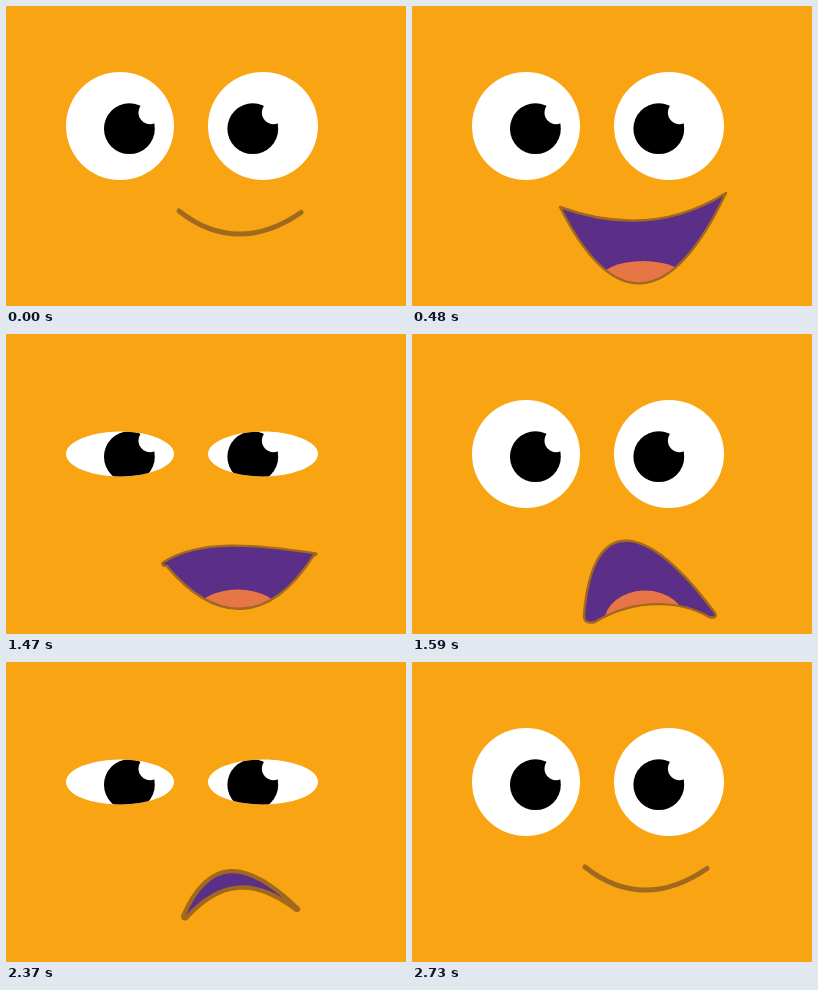
An HTML page that plays this animation: 400x300 px, repeating every 2.91 s.

```html
<!DOCTYPE html>
<html lang="en">
<head>
<meta charset="utf-8">
<title>Changing moods</title>
<style>
  html, body { margin: 0; width: 100%; height: 100%; overflow: hidden; background: #f9a513; }
  svg { display: block; width: 100%; height: 100%; }
  .mouth { fill: #5b2e88; }
  .tongue { fill: #e87545; }
  .lips { fill: none; stroke: #a0691e; stroke-linecap: round; stroke-linejoin: round; }
</style>
</head>
<body>
<svg viewBox="0 0 400 300">
  <defs>
    <clipPath id="lids">
      <ellipse class="lid" cx="114" cy="120" rx="54"/>
      <ellipse class="lid" cx="257" cy="120" rx="55"/>
    </clipPath>
    <clipPath id="inside"><path class="shape"/></clipPath>
    <g id="pupil">
      <circle cx="123.4" cy="122.7" r="25.4"/>
      <circle cx="144" cy="106.7" r="11.5" fill="#fff"/>
    </g>
  </defs>
  <rect width="400" height="300" fill="#f9a513"/>
  <g clip-path="url(#lids)">
    <rect x="50" y="50" width="270" height="140" fill="#fff"/>
    <use href="#pupil"/>
    <use href="#pupil" x="123.4"/>
  </g>
  <path class="shape mouth"/>
  <g clip-path="url(#inside)"><ellipse class="tongue"/></g>
  <path class="shape lips"/>
</svg>
<script>
const LOOP = 2910, TICK = 30;
const OPEN = 54, STRETCHED = 56.7, SHUT = 5.5;

const lowTongue = { cx: 231, cy: 275, rx: 44, ry: 20 };
const highTongue = { cx: 233, cy: 289, rx: 41, ry: 32.5 };

// A mouth is an upper curve, a right tip, a lower curve and a left heel.
const openMouth = (upper, tip, lower, heel, tongue) =>
  ({ points: [...upper, tip, ...lower, heel], tongue, line: 2.4 });

// A closed mouth runs along one curve and back.
const closedMouth = (left, a, b, right) =>
  ({ points: [left, a, b, right, right, right, b, a, left, left], tongue: lowTongue, line: 5 });

const smile = closedMouth([173, 205], [212, 236], [254, 235], [295, 206.5]);
const frown = closedMouth([179, 245], [210, 203], [240, 197], [288, 235.5]);
const laugh = openMouth(
  [[148, 201], [200, 220], [258, 222], [314, 187]], [314, 187],
  [[314, 187], [258, 305], [200, 305], [148, 201]], [148, 201], lowTongue);
const shout = openMouth(
  [[172, 280], [181, 176], [236, 189], [303, 279]], [306, 285],
  [[297, 283], [272, 268], [226, 262], [183, 288]], [171, 291], highTongue);

const blinks = [
  { stretch: 120, close: 210, shut: 240, wake: 360, end: 480 },
  { stretch: 1200, close: 1290, shut: 1350, wake: 1410, end: 1590 },
  { stretch: 2280, close: 2310, shut: 2400, wake: 2520, end: 2730 }
];
const moods = [
  { start: 360, end: 480, mouth: laugh },
  { start: 1410, end: 1560, mouth: shout },
  { start: 2310, end: 2400, mouth: frown },
  { start: 2550, end: 2700, mouth: smile }
];

const all = name => document.querySelectorAll('.' + name);
const lids = all('lid'), shapes = all('shape');
const [tongue] = all('tongue'), [lips] = all('lips');

const ramp = (start, end, t) => Math.min(1, Math.max(0, (t - start) / (end - start)));
const smooth = k => k * k * (3 - 2 * k);
const overshoot = k => smooth(k) + 1.2 * k * k * (1 - k);

// Blends numbers, and lists or objects of numbers.
function mix(a, b, k) {
  if (typeof a === 'number') return a + (b - a) * k;
  if (Array.isArray(a)) return a.map((v, i) => mix(v, b[i], k));
  return Object.fromEntries(Object.keys(a).map(key => [key, mix(a[key], b[key], k)]));
}

function lidHeight(t) {
  const blink = blinks.find(b => t >= b.stretch && t < b.end);
  if (!blink) return OPEN;
  if (t < blink.wake) return mix(STRETCHED, SHUT, ramp(blink.close, blink.shut, t));
  return mix(SHUT, OPEN, overshoot(ramp(blink.wake, blink.end, t)));
}

const mouthAt = t => moods.reduce(
  (mouth, next) => mix(mouth, next.mouth, smooth(ramp(next.start, next.end, t))), smile);

function outline(p) {
  return `M${p[0]}C${p.slice(1, 4)}Q${p[4]},${p[5]}C${p.slice(6, 9)}Q${p[9]},${p[0]}Z`;
}

function draw(now) {
  const t = Math.floor((now % LOOP) / TICK) * TICK;
  const height = lidHeight(t), mouth = mouthAt(t);
  lids.forEach(lid => lid.setAttribute('ry', height));
  shapes.forEach(path => path.setAttribute('d', outline(mouth.points)));
  for (const key in mouth.tongue) tongue.setAttribute(key, mouth.tongue[key]);
  lips.setAttribute('stroke-width', mouth.line);
}

let begin;
function frame(now) {
  begin ??= now;
  draw(Math.max(0, now - begin));
  requestAnimationFrame(frame);
}
draw(0);
requestAnimationFrame(frame);
</script>
</body>
</html>
```
